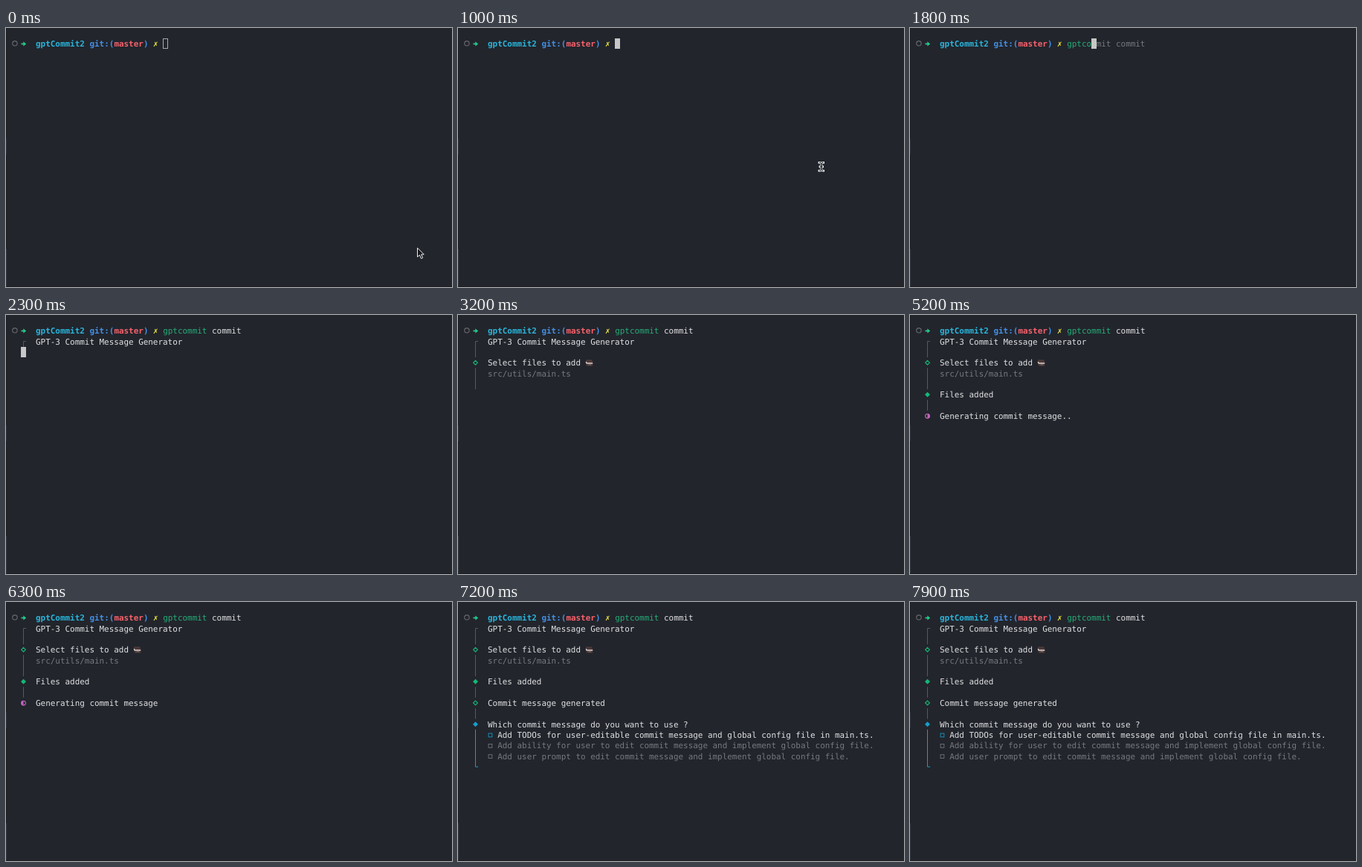
Animation, 600 px wide and 349 px high, one loop 8 s. Source, as an HTML page:

```html
<!DOCTYPE html>
<html lang="en">
<head>
<meta charset="utf-8">
<title>Commit generator in a terminal</title>
<style>
  html, body { margin: 0; width: 100%; height: 100%; overflow: hidden; background: #22252c; }
  svg { display: block; width: 600px; height: 349px; }
  text {
    font: 10.935px "DejaVu Sans Mono", "Liberation Mono", monospace;
    text-rendering: geometricPrecision;
    white-space: pre;
  }
  .bold { font-weight: bold; }
</style>
</head>
<body>
<svg id="stage" viewBox="0 0 600 349" xmlns="http://www.w3.org/2000/svg"></svg>
<script>
const LOOP = 8000, COL = 6.583, ROW = 14.35, LEFT = 20.3, MID = 21.2, AXIS = 23.5;
const C = {
  text: '#e0e1e2', dim: '#76797d', bar: '#555960', green: '#14b877', cyan: '#149fca',
  magenta: '#c364bd', command: '#26ae78', cursor: '#c6c7c6'
};
const T = { focus: 800, type: 1400, accept: 2000, enter: 2100, header: 2300, select: 2400,
  toggle: 3000, submit: 3200, spin: 3320, done: 6400 };
const NS = 'http://www.w3.org/2000/svg';
const stage = document.getElementById('stage');
const timed = [];

const x = col => LEFT + col * COL;
const y = row => MID + row * ROW;

function add(tag, attrs, parent = stage) {
  const el = document.createElementNS(NS, tag);
  for (const key in attrs) el.setAttribute(key, attrs[key]);
  parent.append(el);
  return el;
}
const path = (d, attrs, parent) => add('path', { d, fill: 'none', ...attrs }, parent);
const rect = (x, y, width, height, fill, parent) => add('rect', { x, y, width, height, fill }, parent);

function text(col, row, str, fill, parent, cls = '') {
  const el = add('text', { x: x(col), y: y(row) + 4, fill, class: cls }, parent);
  el.textContent = str;
  return el;
}

// Group that is visible from one time to another
function during(from, to = LOOP) {
  const el = add('g', {});
  timed.push({ el, from, to });
  return el;
}

function diamond(row, color, filled, g) {
  const r = filled ? 3.5 : 2.9;
  path(`M${AXIS} ${y(row) - r}l${r} ${r}l${-r} ${r}l${-r} ${-r}z`,
    filled ? { fill: color } : { stroke: color, 'stroke-width': 1.1 }, g);
}
const bar = (from, to, color, g) =>
  path(`M${AXIS} ${y(from - .5)}V${y(to + .5)}`, { stroke: color }, g);
const corner = (row, dir, color, g) =>
  path(`M${AXIS + 3.5} ${y(row)}H${AXIS}v${dir * ROW / 2}`, { stroke: color }, g);

function option(row, label, active, g, checked) {
  const color = checked ? C.green : active ? C.cyan : C.dim;
  add('rect', { x: x(3) + 1, y: y(row) - 2, width: 4.8, height: 4.8,
    fill: checked ? color : 'none', stroke: color, 'stroke-width': .85 }, g);
  text(5, row, label, active ? C.text : C.dim, g);
}

// Window edges
rect(0, 0, 1, 349, '#1b1d22');
rect(0, 149, 1, 21, '#2d3037');
rect(0, 298, 1, 51, '#34373e');
rect(0, 348, 600, 1, '#1a1c21');

// Prompt
add('circle', { cx: 11.9, cy: 20.8, r: 3.2, fill: 'none', stroke: '#686a6e', 'stroke-width': 1.1 });
path('M20.5 21.4h4', { stroke: '#25c98a', 'stroke-width': 1.8 });
path('M23.3 18.2l3.9 3.2l-3.9 3.2z', { fill: '#25c98a' });
[[3, 'gptCommit2', '#2ab5db'], [14, 'git:(', '#4490e6'], [19, 'master', '#f8616b'],
 [25, ')', '#4490e6'], [27, '✗', '#f1ee45']]
  .forEach(([col, str, color]) => text(col, 0, str, color, stage, 'bold'));

const typed = text(29, 0, '', C.command);
const ghost = text(29, 0, '', C.dim);
text(39, 0, 'commit', C.text, during(T.accept));

// Header
const header = during(T.header);
corner(1, 1, C.bar, header);
text(3, 1, 'GPT-3 Commit Message Generator', C.text, header);

// File picker
const picker = during(T.select);
bar(2, 2, C.bar, picker);
text(3, 3, 'Select files to add', C.text, picker);
path('M172 60.3h8l1.3 3.2v5.2h-8l-1.3 -3z', { fill: '#493838' }, picker);
path('M172.2 63.2l1 1.8h8', { stroke: '#d8d0cc', 'stroke-width': 1.5 }, picker);
rect(175.5, 66.4, 3.5, 1, '#8d7771', picker);

const choosing = during(T.select, T.submit);
diamond(3, C.cyan, true, choosing);
bar(4, 5, C.cyan, choosing);
corner(6, -1, C.cyan, choosing);
option(5, 'src/utils/utils.ts', false, choosing);
option(4, 'src/utils/main.ts', true, during(T.select, T.toggle));
option(4, 'src/utils/main.ts', true, during(T.toggle, T.submit), true);

const chosen = during(T.submit);
diamond(3, C.green, false, chosen);
bar(4, 5, C.bar, chosen);
text(3, 4, 'src/utils/main.ts', C.dim, chosen);

// Spinner
const added = during(T.spin - 20);
diamond(6, C.green, true, added);
text(3, 6, 'Files added', C.text, added);
bar(7, 7, C.bar, added);

const spinner = during(T.spin - 20, T.done);
add('circle', { cx: AXIS, cy: y(8) + .2, r: 2.9, fill: 'none', stroke: C.magenta, 'stroke-width': 1.1 }, spinner);
const half = path(`M${AXIS - 3} ${y(8) + .2}a3 3 0 0 0 6 0z`, { fill: C.magenta }, spinner);
const progress = text(3, 8, '', C.text, spinner);

// Message picker
const result = during(T.done);
diamond(8, C.green, false, result);
text(3, 8, 'Commit message generated', C.text, result);
bar(9, 9, C.bar, result);
diamond(10, C.cyan, true, result);
text(3, 10, 'Which commit message do you want to use ?', C.text, result);
bar(11, 13, C.cyan, result);
corner(14, -1, C.cyan, result);
['Add TODOs for user-editable commit message and global config file in main.ts.',
 'Add ability for user to edit commit message and implement global config file.',
 'Add user prompt to edit commit message and implement global config file.']
  .forEach((label, i) => option(11 + i, label, i === 0, result));

// Text cursor
add('rect', { x: 211.5, y: 14.5, width: 6, height: 13, fill: 'none', stroke: '#a9aba9' }, during(0, T.focus));
const block = rect(0, 0, 7, 14, C.cursor, during(T.focus, T.select));

// Mouse pointers
const arrow = path('M0 0V12.2L2.9 9.6L5 14.4L7.2 13.4L5.1 8.8H8.8Z',
  { fill: '#16181c', stroke: '#eeeeee', 'stroke-linejoin': 'round' }, during(0, T.focus));
const beam = during(T.focus, T.type);
const beamShape = 'M486 181.3q2.8 0 2.8 2v7q0 2 -2.8 2M491.6 181.3q-2.8 0 -2.8 2v7q0 2 2.8 2M487 186.8h3.6';
path(beamShape, { stroke: '#eeeeee', 'stroke-width': 2.8, 'stroke-linecap': 'square' }, beam);
path(beamShape, { stroke: '#16181c', 'stroke-width': 1 }, beam);

function drawTyping(t) {
  const word = 'gptcommit';
  const count = t < T.type ? 0 : t < T.accept ? Math.min(5, Math.floor((t - T.type) / 100) + 1) : word.length;
  typed.textContent = word.slice(0, count);
  ghost.textContent = count && t < T.accept ? (word + ' commit').slice(count) : '';
  ghost.setAttribute('x', x(29 + count));

  const [col, row] = t < T.accept ? [29 + count, 0]
    : t < T.enter ? [45, 0] : t < T.header ? [0, 1] : [0, 2];
  block.setAttribute('x', Math.round(x(col)));
  block.setAttribute('y', Math.round(y(row) - 7));
}

function drawSpinner(t) {
  const step = Math.max(0, Math.floor((t - T.spin) / 80));
  const dots = Math.min(3, Math.floor(step % 33 / 8));
  half.setAttribute('transform', `rotate(${step % 4 * 90} ${AXIS} ${y(8) + .2})`);
  progress.textContent = 'Generating commit message' + '.'.repeat(dots);
}

function drawArrow(t) {
  const step = Math.max(0, Math.min(4, Math.floor(t / 100) - 1));
  const p = (1 - Math.cos(Math.PI * step / 4)) / 2;
  arrow.setAttribute('transform', `translate(${553.5 - 67 * p} ${296.3 - 111 * p})`);
}

function draw(now) {
  const t = now % LOOP;
  for (const { el, from, to } of timed)
    el.setAttribute('visibility', t >= from && t < to ? 'visible' : 'hidden');
  drawTyping(t);
  drawSpinner(t);
  drawArrow(t);
}

const start = performance.now();
function frame() {
  draw(performance.now() - start);
  requestAnimationFrame(frame);
}
frame();
</script>
</body>
</html>
```
